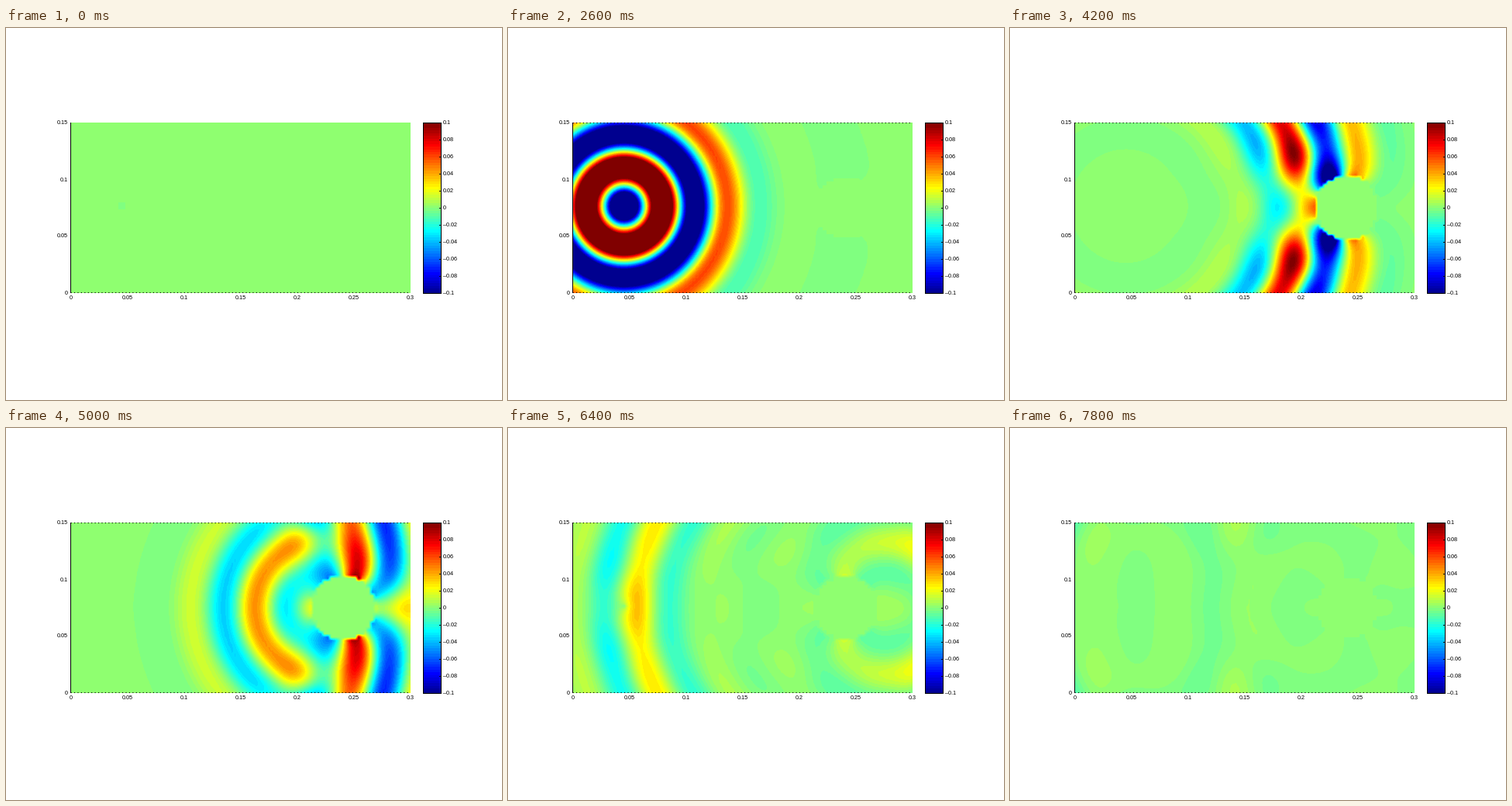
A matplotlib script that plays this animation: 640x480 px, repeating every 8000 ms.

```python
import numpy as np
import matplotlib.pyplot as plt
from matplotlib.animation import FuncAnimation

# 2D TE FDTD: a pulsed Hz point source in front of a metal cylinder, PML walls
NX, NY, PML = 100, 50, 10
COURANT = 0.5
SRC = (15, 25)
CYL_X, CYL_Y, CYL_R = 80, 25, 10
TAU, DELAY = 32, 96                  # pulse width and delay in steps
OMEGA = 2 * np.pi * 0.025            # 5 GHz at 5 ps per step
FRAMES, STEPS = 40, 10

DPI = 80
PX = 72 / DPI
LEFT, TOP, WIDE, HIGH = 83, 122, 439, 220
BAR_L, BAR_R = 538, 562
VMAX = 0.1


def pml_coeffs(pos, n):
    """Update factors at cell positions counted from the inner domain edge."""
    depth = np.clip(np.maximum(-pos, pos - n), 0, None) / PML
    s_max = COURANT * 3 * -np.log(1e-5) / (2 * PML)
    s = s_max * depth ** 2 / 2
    return (1 - s) / (1 + s), COURANT / (1 + s)


def pulse(n):
    if n > 7 * TAU:
        return 0.0
    return np.sin(OMEGA * (n - DELAY)) * np.exp(-((n - DELAY) / TAU) ** 2)


def simulate():
    nx, ny = NX + 2 * PML, NY + 2 * PML
    x_edge, y_edge = np.arange(nx + 1.0) - PML, np.arange(ny + 1.0) - PML
    x_mid, y_mid = x_edge[:-1] + 0.5, y_edge[:-1] + 0.5

    def outside(x, y):
        return np.hypot(x[:, None] - CYL_X, y[None] - CYL_Y) > CYL_R

    free_x = outside(x_mid, y_edge[1:-1])
    free_y = outside(x_edge[1:-1], y_mid)
    ax_e, bx_e = (c[:, None] for c in pml_coeffs(x_edge[1:-1], NX))
    ax_h, bx_h = (c[:, None] for c in pml_coeffs(x_mid, NX))
    ay_e, by_e = pml_coeffs(y_edge[1:-1], NY)
    ay_h, by_h = pml_coeffs(y_mid, NY)

    ex, ey = np.zeros((nx, ny + 1)), np.zeros((nx + 1, ny))
    hzx, hzy = np.zeros((nx, ny)), np.zeros((nx, ny))
    src = (SRC[0] + PML, SRC[1] + PML)
    shots = []
    for n in range((FRAMES - 1) * STEPS + 1):
        hz = hzx + hzy
        ex[:, 1:-1] = free_x * (ay_e * ex[:, 1:-1] + by_e * np.diff(hz, axis=1))
        ey[1:-1] = free_y * (ax_e * ey[1:-1] - bx_e * np.diff(hz, axis=0))
        hzx = ax_h * hzx - bx_h * np.diff(ey, axis=0)
        hzy = ay_h * hzy + by_h * np.diff(ex, axis=1)
        hzx[src] = hzy[src] = pulse(n) / 2
        if n % STEPS == 0:
            shots.append((hzx + hzy)[PML:-PML, PML:-PML])
    return shots


def jet64():
    i = np.arange(64)
    ramps = [(i - 23, 71 - i), (i - 7, 55 - i), (i + 9, 39 - i)]
    rgb = [np.clip(np.minimum(up, down) / 16, 0, 1) for up, down in ramps]
    return np.round(255 * np.stack(rgb, axis=1)).astype(np.uint8)


def lerp_weights(pixels, n):
    t = np.linspace(0, n - 1, pixels)
    return np.clip(1 - np.abs(t[:, None] - np.arange(n)), 0, None)


JET = jet64()
W_X = lerp_weights(WIDE, NX)
W_Y = lerp_weights(HIGH, NY)[::-1]
shots = simulate()


def paint(hz):
    v = (W_Y @ hz.T @ W_X.T).astype(np.float32)
    level = np.floor((v / np.float32(2 * VMAX) + np.float32(0.5)) * 64)
    return JET[np.clip(level, 0, 63).astype(int)]


fig = plt.figure(figsize=(8, 6), dpi=DPI, facecolor="white")
ax = fig.add_axes([0, 0, 1, 1])
ax.axis("off")


def picture(rgb, left, right, top, bottom):
    return ax.imshow(rgb, extent=(left, right, bottom, top), aspect="auto",
                     interpolation="nearest")


def line(xs, ys, **kw):
    # Unsnapped, so half-pixel coordinates fill exactly one pixel row
    return ax.plot(xs, ys, color="black", lw=PX, snap=False,
                   solid_capstyle="butt", solid_joinstyle="miter",
                   dash_capstyle="butt", **kw)[0]


def label(x, y, value, ha):
    text = f"{value:g}".replace("-", "\u2013")
    ax.text(x, y, text, ha=ha, va="center", fontsize=7.2 * PX,
            family="Liberation Sans", color="black")


bottom = TOP + HIGH
field = picture(paint(shots[0]), LEFT, LEFT + WIDE, TOP, bottom)
picture(JET[::-1, None], BAR_L, BAR_R, TOP, bottom + 1)
ax.set_xlim(0, 640)
ax.set_ylim(480, 0)

# Plot frame
x0, x1 = LEFT + 0.5, LEFT + WIDE - 0.5
y0, y1 = TOP + 0.5, bottom - 0.5
dots = (0, (1.2, 3.23))
line([x0, x0], [TOP, bottom])
line([x0, x1], [y1, y1], linestyle=dots)
top_edge = line([x0, x1], [y0, y0], linestyle=dots)
for k in range(7):
    label(x0 + k * (x1 - x0) / 6, 349, round(0.05 * k, 2), "center")
for k in range(4):
    label(80, y1 + 0.5 - k * (y1 - y0) / 3, round(0.05 * k, 2), "right")

# Colour bar
bar_x = np.array([BAR_L, BAR_R, BAR_R, BAR_L, BAR_L]) + [0.5, -0.5, -0.5, 0.5, 0.5]
line(bar_x, [y0, y0, bottom + 0.5, bottom + 0.5, y0])
for k in range(11):
    y = y0 + 22 * k
    line([BAR_R - 3, BAR_R], [y, y])
    label(564, y + 0.5, round(VMAX - 0.02 * k, 2) + 0.0, "left")


def update(k):
    field.set_data(paint(shots[k]))
    top_edge.set_visible(k > 0)
    return field, top_edge


anim = FuncAnimation(fig, update, frames=FRAMES, interval=200, repeat=True,
                     repeat_delay=0, blit=False)
plt.show()
```
